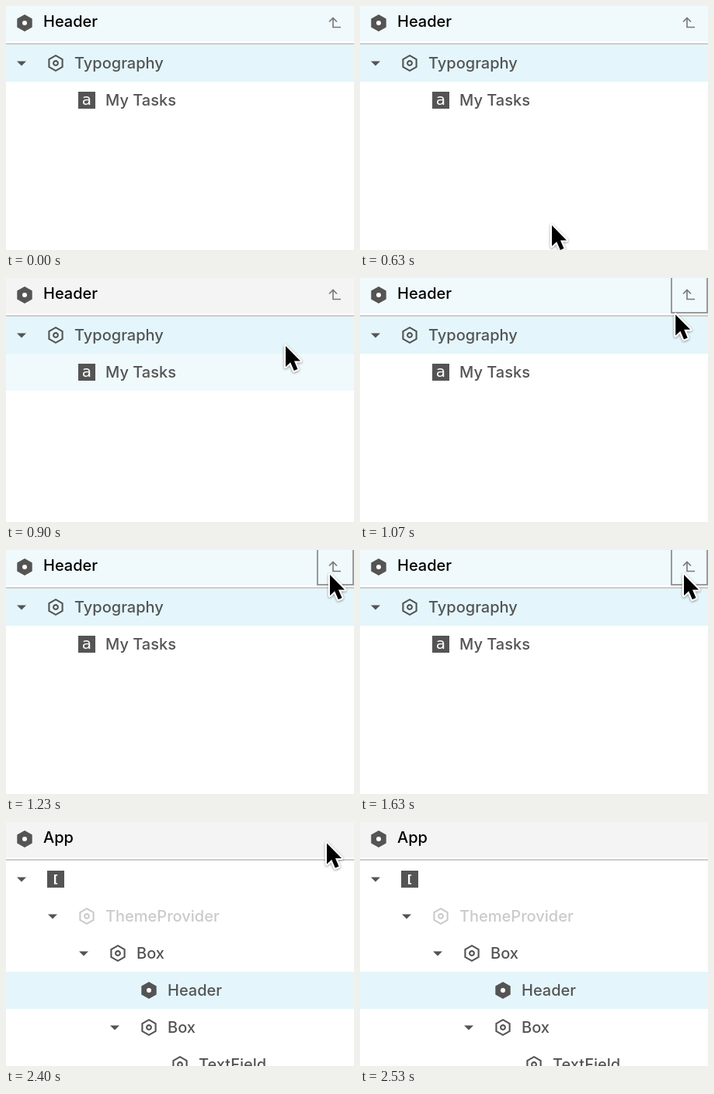
Animation of 448x316 px, one loop 4.17 s. Source, as an HTML page:

```html
<!DOCTYPE html>
<html lang="en">
<head>
<meta charset="utf-8">
<title>Component tree</title>
<style>
  html, body { margin: 0; width: 100%; height: 100%; overflow: hidden; background: #fff; }
  svg { display: block; width: 448px; height: 316px; }
  text { font: 500 20px Inter, sans-serif; fill: #545454; }
  .title { fill: #000; }
  .glyph { font: 20px "DejaVu Sans", sans-serif; fill: #fff; text-anchor: middle; }
  .bracket { font-size: 14px; font-weight: bold; }
  #cursor { filter: drop-shadow(0 1px 1.5px rgba(0, 0, 0, .4)); }
</style>
</head>
<body>
<svg viewBox="0 0 448 316">
  <defs>
    <path id="hex" d="M0-11 9.7-5.5V5.5L0 11-9.7 5.5V-5.5Z"/>
    <g id="solid" fill="#545454"><use href="#hex"/><circle r="3" fill="#fff"/></g>
    <g id="outline" fill="none" stroke="#545454" stroke-width="2.1">
      <path d="M0-9.8 8.6-4.9V4.9L0 9.8-8.6 4.9V-4.9Z"/><circle r="2.9"/>
    </g>
    <path id="arrow" d="M-6-2.5H6L0 3.5Z" fill="#545454"/>
    <rect id="tile" x="-11" y="-11" width="22" height="22" fill="#545454"/>
  </defs>
  <rect id="bar" width="448" height="46"/>
  <rect y="48" width="448" height="2" fill="#ccc"/>
  <use href="#solid" x="24" y="22"/>
  <g id="before"></g>
  <g id="after"></g>
  <path id="cursor" d="M0 0V27L6.2 21.2 10.8 32 15.5 30 11 19.4H19Z"
        stroke="#fff" stroke-width="4.4" stroke-linejoin="round" paint-order="stroke"/>
</svg>
<script>
const LOOP = 4170, FPS = 30;
const $ = id => document.getElementById(id);

// Tree row: index from the top, indent level, icon, label, extras
function row(i, level, icon, label, { open, faded } = {}) {
  const x = 24 + 40 * level, y = 74 + 48 * i;
  const glyph = icon === 'a' ? `<text class="glyph" x="${x}" y="${y + 5.5}">a</text>`
    : icon === '[' ? `<text class="glyph bracket" x="${x}" y="${y + 4.5}">[</text>` : '';
  return (open ? `<use href="#arrow" x="${x - 44}" y="${y}"/>` : '') +
    `<g opacity="${faded ? 0.3 : 1}">
      <use href="#${glyph ? 'tile' : icon}" x="${x}" y="${y}"/>${glyph}
      <text x="${x + 24}" y="${y + 7}">${label}</text></g>`;
}
const band = (i, color, id = '') =>
  `<rect id="${id}" y="${50 + 48 * i}" width="448" height="48" fill="${color}"/>`;
const title = s => `<text class="title" x="48" y="27">${s}</text>`;

$('before').innerHTML = title('Header') +
  band(0, '#e4f6fb') + band(1, '#f0f9fc', 'hover') +
  row(0, 1, 'outline', 'Typography', { open: true }) +
  row(1, 2, 'a', 'My Tasks') +
  `<rect id="button" x="401" y="-3" width="46" height="48" fill="none" stroke="#8a8a8a" stroke-width="1.7"/>
   <path d="M416 20.5 421 15.5 426 20.5M421 16V27.5H431" fill="none" stroke="#777" stroke-width="1.6"/>`;

$('after').innerHTML = title('App') + band(3, '#e4f6fb') +
  row(0, 1, '[', '', { open: true }) +
  row(1, 2, 'outline', 'ThemeProvider', { open: true, faded: true }) +
  row(2, 3, 'outline', 'Box', { open: true }) +
  row(3, 4, 'solid', 'Header') +
  row(4, 4, 'outline', 'Box', { open: true }) +
  row(5, 5, 'outline', 'TextField');

// Pointer keys: frame, x, y
const keys = [[19, 247, 284], [22, 188, 212], [24, 225, 155], [27, 360, 88],
              [30, 400, 57], [34, 408, 41], [37, 417, 32]];

function slope(i, c) {
  const a = keys[Math.max(i - 1, 0)], b = keys[Math.min(i + 1, keys.length - 1)];
  return (b[c] - a[c]) / (b[0] - a[0]);
}
function pointer(n) {
  if (n > 71) return [417 - 4 * (n - 71), 32 - 4.5 * (n - 71) ** 2];
  if (n >= 37) return [417, 32];
  const i = keys.findIndex((k, j) => n < keys[j + 1][0]);
  const a = keys[i], b = keys[i + 1], d = b[0] - a[0], u = (n - a[0]) / d, v = 1 - u;
  return [1, 2].map(c => v * v * (1 + 2 * u) * a[c] + u * u * (3 - 2 * u) * b[c] +
    d * u * v * (v * slope(i, c) - u * slope(i + 1, c)));
}

const show = (id, on) => $(id).setAttribute('visibility', on ? 'visible' : 'hidden');

function draw(t) {
  const n = Math.floor((t % LOOP + 4) * FPS / 1000);
  const clicked = n >= 51;
  $('before').style.display = clicked ? 'none' : '';
  $('after').style.display = clicked ? '' : 'none';
  $('bar').setAttribute('fill', clicked || (n >= 25 && n < 31) ? '#f4f4f4' : '#f0f9fc');
  show('hover', n >= 25 && n < 28);
  show('button', n >= 32);
  const visible = n >= 19 && n < 76;
  show('cursor', visible);
  if (visible) $('cursor').setAttribute('transform', `translate(${pointer(n)})`);
}

const start = performance.now();
function tick() {
  draw(performance.now() - start);
  requestAnimationFrame(tick);
}
tick();
</script>
</body>
</html>
```
